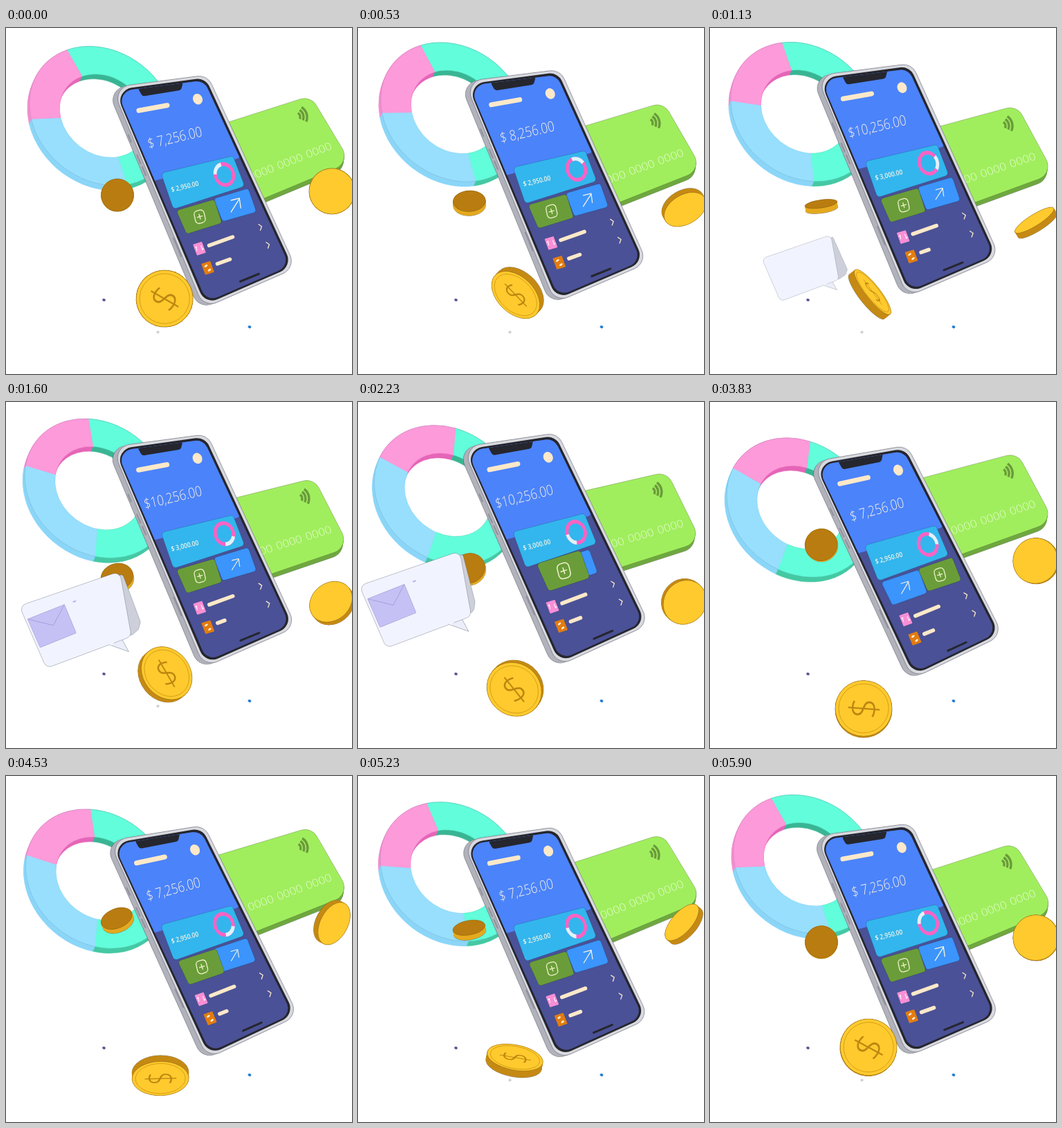
An HTML page with a canvas that plays this animation: 500x500 px, repeating every 5930 ms.

```html
<!DOCTYPE html>
<html lang="en">
<head>
<meta charset="utf-8">
<title>Mobile banking</title>
<style>
html, body { margin: 0; width: 100%; height: 100%; overflow: hidden; background: #fff; }
canvas { display: block; width: 100vw; height: 100vh; }
</style>
</head>
<body>
<canvas id="stage" width="500" height="500"></canvas>
<script>
const ctx = document.getElementById('stage').getContext('2d');
const LOOP = 5930, STEPS = 119, TAU = Math.PI * 2, RAD = Math.PI / 180;
const FONT = "'Open Sans', 'Noto Sans', sans-serif";
const CREAM = '#fde9c9', INK = '#25262e', GOLD = '#ffca2e', BRONZE = '#b97c10';
const EDGE = 'rgba(50,60,70,.45)';

const lerp = (a, b, k) => a + (b - a) * k;
const clamp = x => Math.min(1, Math.max(0, x));
const ramp = (ms, from, span) => clamp((ms - from) / span);
const ease = k => k * k * (3 - 2 * k);
const wave = (p, mid, amp, peak) => mid + amp * Math.cos(TAU * (p - peak));
const beat = p => Math.cos(2 * TAU * p);
const shift = (pts, x, y) => pts.map(p => [p[0] + x, p[1] + y]);

function within(draw) { ctx.save(); draw(); ctx.restore(); }

function paint(fill, stroke, width = 1) {
  if (fill) { ctx.fillStyle = fill; ctx.fill(); }
  if (stroke) { ctx.strokeStyle = stroke; ctx.lineWidth = width; ctx.stroke(); }
}

function poly(pts, r, fill, stroke, width) {
  const n = pts.length, last = pts[n - 1];
  ctx.beginPath();
  ctx.moveTo((last[0] + pts[0][0]) / 2, (last[1] + pts[0][1]) / 2);
  pts.forEach((p, i) => {
    const q = pts[(i + 1) % n];
    ctx.arcTo(p[0], p[1], q[0], q[1], r);
  });
  ctx.closePath();
  paint(fill, stroke, width);
}

function line(pts, color, width) {
  ctx.beginPath();
  pts.forEach(p => ctx.lineTo(p[0], p[1]));
  ctx.lineCap = ctx.lineJoin = 'round';
  paint(null, color, width);
}

function disc(x, y, rx, ry, turn, fill, stroke, width) {
  ctx.beginPath();
  ctx.ellipse(x, y, rx, ry, turn, 0, TAU);
  paint(fill, stroke, width);
}

function label(text, x, y, size, weight, color, axes) {
  within(() => {
    ctx.transform(...axes, x, y);
    ctx.font = `${weight} ${size}px ${FONT}`;
    ctx.textAlign = 'right';
    ctx.fillStyle = color;
    ctx.fillText(text, 0, 0);
  });
}

// Start and end angle, face, outer wall, inner wall
const SLICES = [
  [-152, 37, '#62fddb', '#45c9a3', '#3ab594'],
  [37, 134, '#97dffd', '#8bd6f8', '#6fc0e8'],
  [134, 208, '#fd9ad9', '#f48fd0', '#e566b8']
];
const RING = [112, 93];

function ringPart(a, b, outer, inner, fill) {
  const [rx, ry] = RING;
  ctx.beginPath();
  ctx.ellipse(0, 0, rx * outer, ry * outer, 0, a, b);
  ctx.ellipse(1, -1, rx * inner, ry * inner, 0, b, a, true);
  ctx.closePath();
  paint(fill, fill, .4);
}

function donut(p) {
  const x = wave(p, 133, 6, 0), y = wave(p, 136.5, 16, .65), spin = wave(p, 22, -22, .02);
  const layer = (k, draw) => within(() => {
    ctx.translate(x - 3 * k, y + 7 * k);
    ctx.rotate(38 * RAD);
    SLICES.forEach(s => draw((s[0] + spin) * RAD, (s[1] + spin) * RAD, s));
  });
  for (let k = 1; k > 0; k -= 1 / 7) {
    layer(k, (a, b, s) => {
      ringPart(a, b, 1, .8, s[3]);
      ringPart(a, b, .8, .6, s[4]);
    });
  }
  layer(0, (a, b, s) => ringPart(a, b, 1, .6, s[2]));
  disc(x, y, ...RING, 38 * RAD, null, 'rgba(60,90,120,.3)', .6);
}

function bankCard(p) {
  within(() => {
    ctx.translate(465, wave(p, 166, 20, .21));
    ctx.rotate(wave(p, 2.5, -2.6, .93) * RAD);
    ctx.translate(-465, -171);
    const face = [[270, 153], [440, 98], [498, 194], [300, 277]];
    for (let k = 7; k > 0; k--) poly(shift(face, -k / 7, k), 20, '#6fa83f', k === 7 ? EDGE : null, .6);
    poly(face, 20, '#a0ee5d', 'rgba(80,110,50,.6)', .6);
    within(() => {
      ctx.translate(418, 129);
      ctx.rotate(-18 * RAD);
      ctx.lineCap = 'butt';
      for (let r = 7; r < 18; r += 5) {
        ctx.beginPath();
        ctx.arc(0, 0, r, -.7, .7);
        paint(null, '#6a9a3b', 3.4);
      }
    });
    for (let i = 0; i < 4; i++)
      label('0000', 472 - 41.5 * i, 174.5 + 16.3 * i, 16.5, 300, '#e6fbd0', [.96, -.37, .36, .85]);
  });
}

// Tilt of a tumbling coin: how far it leans and which way its visible face looks.
function lean(p) {
  const turn = 540 * p * RAD;
  return Math.sin(turn) * (Math.cos(turn) < 0 ? -1 : 1);
}

function coin(x, y, r, tilt, axis, face, rim, thick, glyph) {
  const dir = axis * RAD, flat = Math.max(.2, Math.sqrt(1 - tilt * tilt));
  const ux = Math.cos(dir) * tilt, uy = Math.sin(dir) * tilt, half = thick / 2;
  for (let k = -half; k <= half; k += .5)
    disc(x + ux * k, y + uy * k, r * flat, r, dir, rim, k === -half ? EDGE : null, .8);
  const fx = x + ux * half, fy = y + uy * half;
  disc(fx, fy, r * flat, r, dir, face, 'rgba(110,75,10,.7)', .6);
  if (glyph === undefined) return;
  disc(fx, fy, r * flat * .88, r * .88, dir, null, '#c9930f', .8);
  within(() => {
    ctx.translate(fx, fy);
    ctx.rotate(dir);
    ctx.scale(flat, 1);
    ctx.rotate(glyph * RAD - dir);
    ctx.font = `300 56px ${FONT}`;
    ctx.textAlign = 'center';
    ctx.fillStyle = '#bd8710';
    ctx.fillText('$', 0, 20);
  });
}

function bronzeCoin(p) {
  coin(161, wave(p, 232, 26, .19), 23.5, -Math.abs(lean(p)), wave(p, 72, 16, .05), BRONZE, '#e5a91f', 8);
}

function sideCoin(p) {
  coin(471, wave(p, 251, 41, .31), 33, lean(p), wave(p, 40, 20, .12), GOLD, '#c58a14', 9);
}

function dollarCoin(p) {
  coin(wave(p, 226.5, 4.5, .15), wave(p, 413, -31, .125), 41, lean(p), wave(p, 115, 27, .22),
    GOLD, '#c58a14', 11, wave(p, -60, 32, .25));
}

function bubble(ms) {
  const age = ms - 800;
  if (age < 0) return;
  const size = (1 - (1 - ramp(ms, 800, 750)) ** 2) * (1 - ease(ramp(ms, 2550, 560)));
  if (size < .01) return;
  const depth = clamp((2800 - ms) / 1600);
  const mail = ease(ramp(ms, 1200, 300)) - ease(ramp(ms, 2550, 200));
  within(() => {
    ctx.translate(78 + 92 * Math.exp(-age / 700), 234 + 143 * Math.exp(-age / 1400));
    ctx.scale(size, size);
    if (depth > .05)
      poly([[54, -69], [62, -64], [72 + 20 * depth, 3], [72 + 16 * depth, 14], [70, 26]], 4, '#cdd0da', EDGE, .6);
    poly([[39, 35], [70, 46], [58, 24]], 0, '#eceffa', EDGE, .8);
    poly([[-88, -20], [57, -70], [74, 24], [-49, 70]], 9, '#f1f4fe', 'rgba(90,95,120,.55)', .7);
    poly([[36, 33], [45, 37], [58, 24]], 0, '#f1f4fe');
    if (mail < .01) return;
    ctx.translate(-41, 9);
    ctx.scale(mail, mail);
    poly([[-35, -10], [18, -31], [35, 10], [-17, 31]], 1, '#c6c1f5', '#a7a2d8', .8);
    line([[-35, -10], [2, -1], [18, -31]], '#9d97d4', .8);
    line([[31, -35], [34, -36]], '#b9b3ee', 2);
  });
}

const LEFT = [[246, 264], [301, 248], [312, 282], [261, 298]];
const RIGHT = [[300, 247], [350, 232], [362, 266], [313, 280]];

function tile(from, to, k, grow, fill, icon) {
  const pts = from.map((a, i) => [lerp(a[0], to[i][0], k), lerp(a[1], to[i][1], k)]);
  const mid = j => pts.reduce((s, q) => s + q[j], 0) / 4;
  const cx = mid(0), cy = mid(1);
  within(() => {
    ctx.translate(cx, cy);
    ctx.scale(grow, grow);
    poly(shift(pts, -cx, -cy), 4, fill, 'rgba(30,45,80,.4)', .7);
    icon();
  });
}

function plusIcon() {
  poly([[-9, -7], [5, -11], [9, 7], [-5, 11]], 5, null, '#eef3c8', 1.3);
  line([[-3.5, 1], [3.5, -1]], '#eef3c8', 1.3);
  line([[-1, -3.5], [1, 3.5]], '#eef3c8', 1.3);
}

function arrowIcon(size) {
  ctx.scale(size, size);
  line([[-6, 10], [6, -9]], '#f4f1df', 1.4);
  line([[-6, -7], [6, -10], [8, 4]], '#f4f1df', 1.4);
}

function balance(ms) {
  const k = 7 + Math.round(3 * ramp(ms, 400, 400) - 3 * ramp(ms, 2450, 600));
  return (k < 10 ? '$ ' : '$') + k + ',256.00';
}

function savingsRing(p) {
  within(() => {
    ctx.translate(315.5, 212);
    ctx.rotate(-20 * RAD);
    ctx.scale(.84, 1);
    ctx.lineCap = 'butt';
    disc(0, 0, 15.5, 15.5, 0, null, '#fb63c4', 5.5);
    const mid = (720 * p - 125) * RAD;
    ctx.beginPath();
    ctx.arc(0, 0, 15.5, mid - .65, mid + .65);
    paint(null, '#def3fb', 5.5);
  });
}

function listRows(p) {
  poly([[270, 313], [283, 309], [289, 325], [276, 329]], 1, '#f88fd5');
  line([[276, 322], [275, 316], [273.5, 318]], '#fff', 1);
  line([[282, 315], [284, 321], [285.5, 319]], '#fff', 1);
  poly([[282, 341], [295, 337], [301, 353], [288, 357]], 1, '#e27c10');
  disc(289, 344, 2.6, 1.4, -.6, '#fff0d8');
  disc(294, 350, 2.6, 1.4, -.6, '#fff0d8');
  const bar = (x, y, w) => line([[x, y], [x + w, y - w * .36]], CREAM, 5.5);
  bar(293.5, 314.5, 34);
  bar(305.5, 341, 14 + 4 * beat(p));
  const chevron = (x, y) => line([[x - 2, y - 4], [x + 2.5, y - 1], [x + .5, y + 4.5]], CREAM, 1.3);
  chevron(367, 288);
  chevron(378, 314);
}

function screen(p, ms) {
  poly([[160, 92], [286, 76], [410, 344], [290, 396]], 17, '#4a5196');
  ctx.clip();
  poly([[140, 60], [290, 50], [342, 187], [207, 223]], 8, '#4b83fa');
  poly([[189, 84], [257, 74], [253, 90], [197, 99]], 5, INK);
  line([[192, 119.5], [233, 112]], CREAM, 7);
  disc(277, 103, 6.8, 8, -.45, CREAM);
  label(balance(ms), 284.5, 156.5, 20.5, 300, '#f6f1e2', [.81, -.19, .22, .98]);

  poly([[224, 210], [328, 185], [345, 229], [242, 262]], 5, '#33b6ed', 'rgba(30,60,110,.4)', .7);
  const total = ms >= 650 && ms < 2450 ? '$ 3,000.00' : '$ 2,950.00';
  label(total, 279, 228, 10.3, 600, '#f4f3e6', [.8, -.19, .22, .95]);
  savingsRing(p);

  const swap = ease(ramp(ms, 2000, 600)) - ease(ramp(ms, 4000, 600));
  tile(RIGHT, LEFT, swap, 1, '#3b95fc', () => arrowIcon(.9 + .1 * beat(p)));
  tile(LEFT, RIGHT, swap, 1 + .22 * Math.sin(Math.PI * swap), '#6a9d39', plusIcon);
  listRows(p);
  line([[338.5, 366.5], [365.5, 355.5]], INK, 3);
}

function phone(p, ms) {
  within(() => {
    ctx.translate(314, wave(p, 222.5, 14.5, .86));
    ctx.rotate(-(wave(p, 1.25, -1.3, .12) - .3) * RAD);
    ctx.translate(-314, -232);
    const body = [[153, 86], [291, 68], [419, 347], [286, 405]];
    line([[334, 172], [340, 185]], '#b9bac2', 3.5);
    for (let k = 7; k > 0; k--) poly(shift(body, -k, k * .3), 20, '#b1b2bb', k === 7 ? EDGE : null, .9);
    const button = (y, h) => {
      const x = 108.5 + y * .44;
      line([[x, y], [x + h * .42, y + h]], '#92939e', 2.2);
    };
    button(155, 10);
    button(184, 12);
    button(201, 12);
    button(304, 26);
    poly(body, 20, '#d8d9df', 'rgba(90,92,102,.7)', .8);
    poly([[157, 90], [288, 72], [414, 345], [288, 400]], 19, INK);
    screen(p, ms);
  });
}

function dots() {
  disc(141.5, 393, 2.4, 2, .3, '#5e5b96');
  disc(352, 432, 2.4, 2, .3, '#2d7fd2');
  disc(219.5, 439.5, 2.2, 2, -.4, '#cfcfd2');
}

function draw(ms) {
  // Pictures alternate between 30 and 70 ms.
  const late = ms % 100 >= 30 ? 1 : 0, block = Math.floor(ms / 100);
  const p = (2 * block + late) / STEPS, held = 100 * block + 30 * late;
  ctx.fillStyle = '#fff';
  ctx.fillRect(0, 0, 500, 500);
  dots();
  donut(p);
  bankCard(p);
  bronzeCoin(p);
  bubble(held);
  phone(p, held);
  sideCoin(p);
  dollarCoin(p);
}

const start = performance.now();
function tick() {
  draw((performance.now() - start) % LOOP);
  requestAnimationFrame(tick);
}
tick();
</script>
</body>
</html>
```
